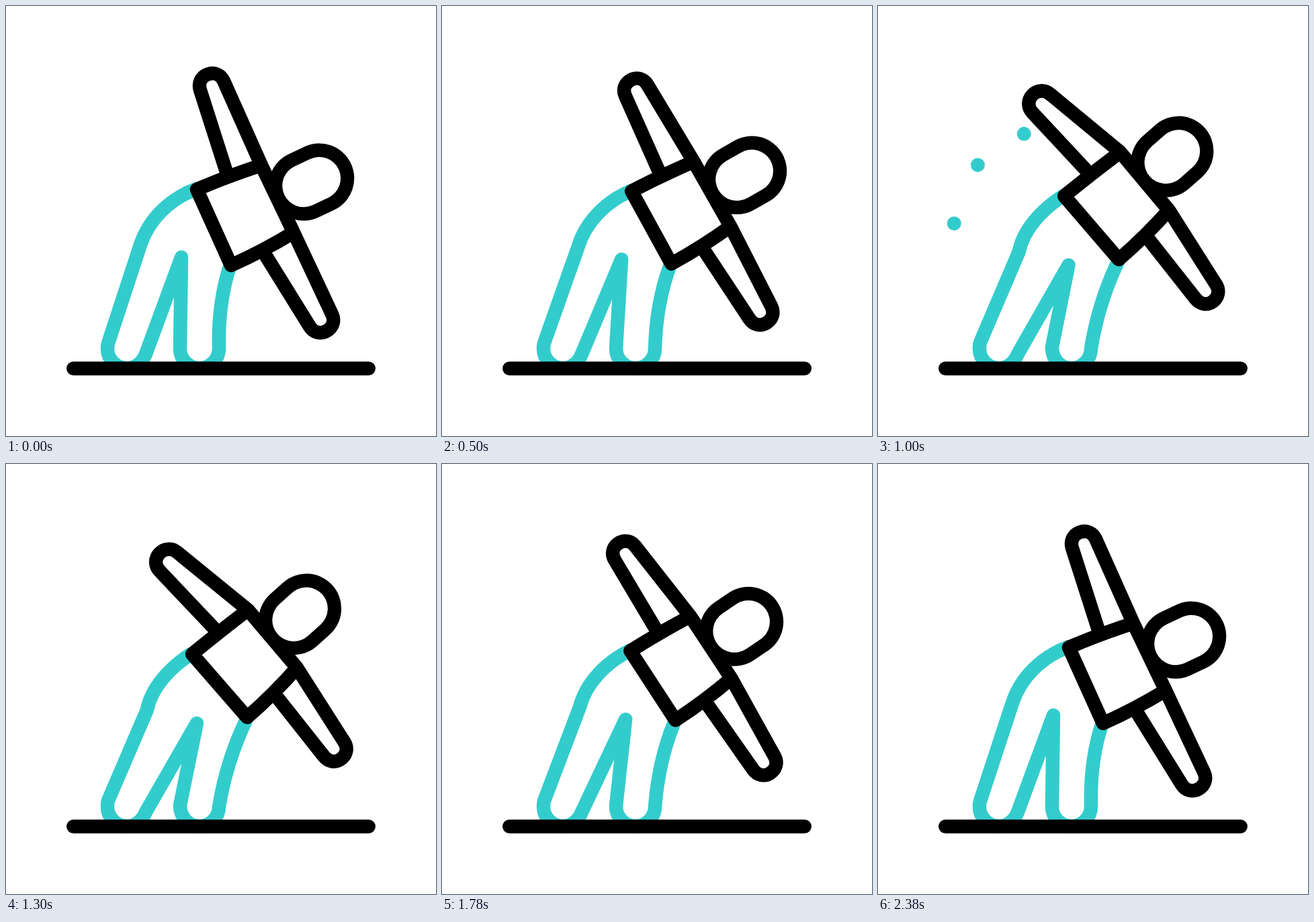
Write an HTML page that moves like this. It is 640 by 640 pixels and loops after 2400 ms.

```html
<!DOCTYPE html>
<html lang="en">
<head>
<meta charset="utf-8">
<title>Side bend</title>
<style>
html, body { margin: 0; width: 100%; height: 100%; overflow: hidden; background: #fff; }
svg { display: block; width: 100vw; height: 100vh; }
path { fill: none; stroke: #000; stroke-width: 20.5; stroke-linecap: round; stroke-linejoin: round; }
.legs { stroke: #3cc; }
.skull { stroke-width: 104; }
.face { stroke: #fff; stroke-width: 63.5; }
.legs, .head, .body { animation: 2400ms cubic-bezier(.7, 0, .3, 1) infinite; }
.legs { animation-name: legs; }
.head { animation-name: head; }
.body { animation-name: body; }
.dots { fill: #3cc; visibility: hidden; animation: blink 2400ms step-end infinite; }

/* Each pose pair shares its path commands, so the points blend linearly. */
@keyframes legs {
  0%, 99.17%, 100% {
    d: path("M284 272C243 287 212 318 199.5 357L152 502C151 505 151 508 151 510C151 526 164 539 180 539C192 539 203 531 208 518L261 374L259 510C259 526 272 539 288 539C304 539 317 526 317 510C316 470 321 425 333 388");
  }
  50% {
    d: path("M275 283C243 304 216 334 210 366L152 501C151 504 151 507 151 510C151 526 164 539 180 539C192 539 203 531 208 518L284 386L259 508C259 526 272 539 288 539C304 539 317 526 317 510C324 468 337 424 357 382");
  }
}
@keyframes head {
  0%, 99.17%, 100% { d: path("M443 267.5L466.3 256.5"); }
  50% { d: path("M428 232L447 215"); }
}
/* torso, upper arm, lower arm */
@keyframes body {
  0%, 99.17%, 100% {
    d: path("M284 273Q328 254 380 237L428 337Q384 364 335 386ZM328 247L289 125C285.9 115 290.1 105.7 299.9 101.8C309.7 97.9 319.6 102 324 111.5L380 237M428 337L485.3 459C489.7 468.5 486.3 478.7 477.1 483.7C467.9 488.7 457.6 485.9 452 477L385 369");
  }
  50% {
    d: path("M277 283Q317 250 360 217L433 303Q400 341 359 377ZM309 244L228.5 159.5C221.1 152 220.9 141.1 227.9 133.3C234.9 125.5 246.4 124.9 254.5 131.5L360 217M433 303L503.6 413.5C509.2 422.4 507.1 432.9 498.5 439C489.9 445.1 479.6 442.6 473 434.5L402 345");
  }
}
@keyframes blink {
  0% { visibility: hidden; }
  33.33% { visibility: visible; }
  44.17%, 100% { visibility: hidden; }
}
</style>
</head>
<body>
<svg viewBox="0 0 640 640">
  <g class="dots">
    <circle cx="217.3" cy="190.3" r="10.5"/>
    <circle cx="148.5" cy="236.7" r="10.5"/>
    <circle cx="113.3" cy="323.7" r="10.5"/>
  </g>
  <path class="legs"/>
  <path class="head skull"/>
  <path class="head face"/>
  <path class="body"/>
  <path d="M100.3 539.5H539.7"/>
</svg>
</body>
</html>
```
